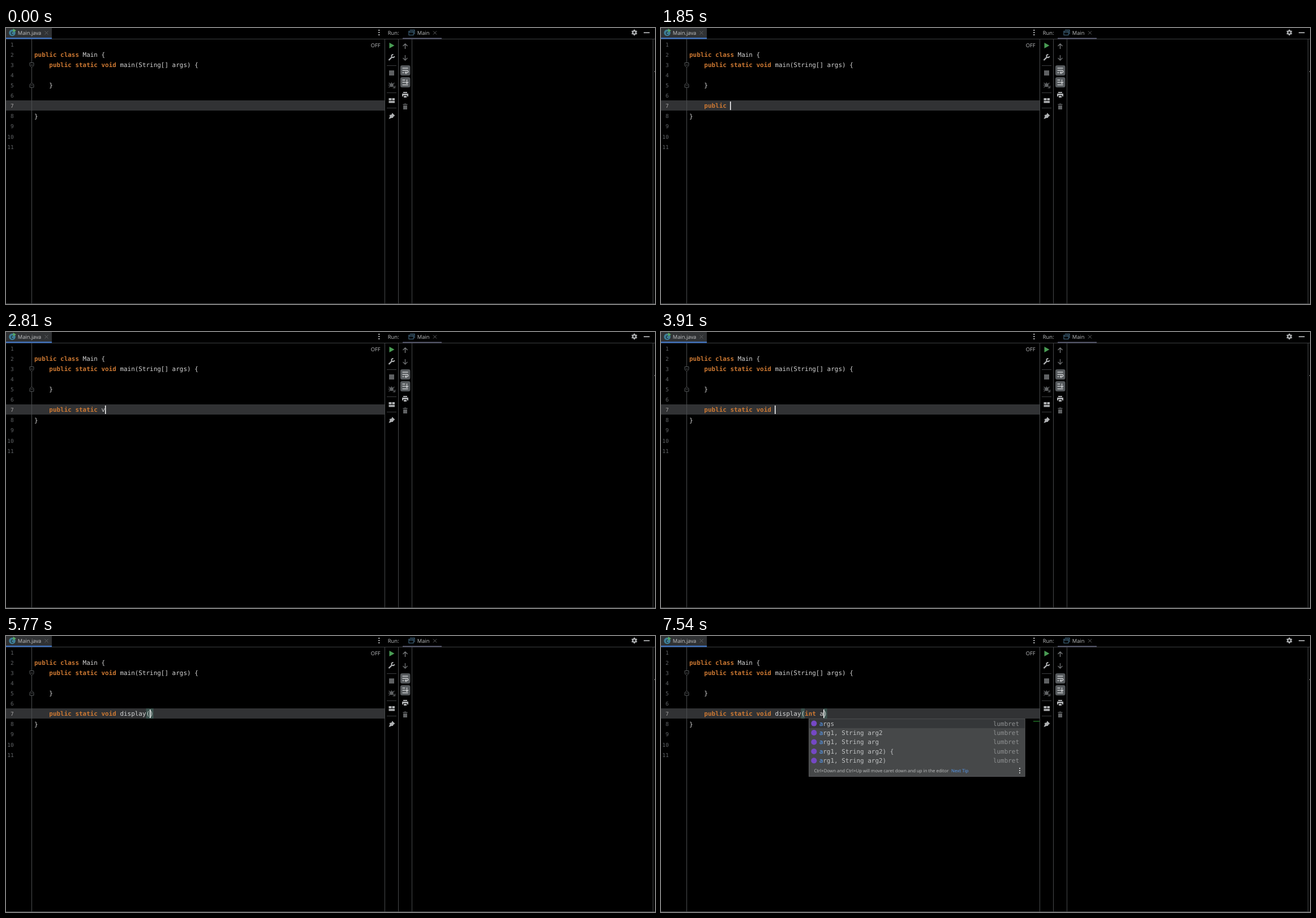
These frames come from a looping animation (1147 by 488 pixels, 8000 ms). An HTML page with a canvas:

```html
<!DOCTYPE html>
<html lang="en">
<head>
<meta charset="utf-8">
<title>Code completion</title>
<style>
  html, body { margin: 0; width: 100%; height: 100%; overflow: hidden; background: #000; }
  canvas { display: block; }
</style>
</head>
<body>
<canvas width="1147" height="488"></canvas>
<script>
const ctx = document.querySelector('canvas').getContext('2d');
const LOOP = 8000;
const CHAR = 6.586, INDENT = 76.3, ROW = 16.44;
const MONO = '10.94px "DejaVu Sans Mono", monospace';
const UI = '9.3px "Open Sans", sans-serif';
const SMALL = '7.85px "Open Sans", sans-serif';
const KEYWORD = '#cc7832', CODE = '#d4d4d4', ICON = '#afb1b3', DIM = '#5f6163', LINE = '#3c3e40';

const TYPED = 'public static void display(int a';

const HINT_CARET = 'Ctrl+Down and Ctrl+Up will move caret down and up in the editor';
const HINT_DOT = 'Press Ctrl+. to choose the selected (or first) suggestion and insert a dot afterwards';
const HINT_KEYS = 'Dot, space and some other keys will also close this lookup and be inserted into editor';

// Suggestion rows: [icon, text, grey text, right-hand tag]
const keyword = text => ['', text, '', ''];
const ai = text => ['ai', text, '', 'lumbret'];
const method = (text, rest) => ['method', text, rest + ' {...}', 'Object'];
const template = (text, note, tag = '') => ['template', text, note, tag];

const intRows = [
  keyword('int'), ai('int x, int y, int width, int height'), ai('int x, int y'),
  ai('int arg1, String arg2'), ai('int arg1, String arg'),
  ai('int x, int y, int width, int height) {')
];
const display = endings => endings.map(end => ai('display(String' + end));

// start: column of the word being completed
const menus = {
  public: { start: 0, x: 53, hint: HINT_CARET, rows: [
    keyword('public'), ai('public static void main(String[] args'),
    ai('public static void main(String[]'), ai('public static void main(String'),
    keyword('private'), keyword('protected'),
    method('public boolean equals', '(Object obj)'),
    ai('public static void main(String[] args)'), ai('public static void main(String[] args) {'),
    method('public int hashCode', '()'), method('public String toString', '()'),
    method('protected Object clone', '()')
  ] },
  static: { start: 7, x: 99, wide: 413, hint: HINT_DOT, rows: [
    keyword('static'), ai('static void main(String[] args'), keyword('strictfp'),
    ai('static void main(String[]'), template('starter', '   Creates a static start(...) helper method …'),
    ai('static void main(String'), ai('static void main(String[] args) {'),
    ai('static void main(String[] args)'), keyword('synchronized'),
    method('public String toString', '()'), template('stopship', '', 'adds // STOPSHIP'),
    method('public int hashCode', '()')
  ] },
  void: { start: 14, x: 149, hint: HINT_CARET, rows: [
    keyword('void'), ai('void main(String[] args) {'), ai('void main(String[] args)'),
    ai('void main(String[] args'), ai('void main(String'), ai('void main(String[]'), keyword('volatile')
  ] },
  displa: { start: 19, x: 182, hint: HINT_CARET, rows: display(['[] args) {', '[] args', '[] args)', '[]', '']) },
  display: { start: 19, x: 182, hint: HINT_CARET, rows: display(['[] args) {', '[] args)', '[] args', '', '[]']) },
  in: { start: 27, x: 234, hint: HINT_KEYS, rows: intRows },
  int: { start: 27, x: 234, hint: HINT_DOT, rows: intRows },
  args: { start: 31, x: 261, hint: HINT_CARET, rows: [
    ai('args'), ai('arg1, String arg2'), ai('arg1, String arg'), ai('arg1, String arg2) {'), ai('arg1, String arg2)')
  ] }
};

// [time, typed characters, open menu, caret hidden]
const steps = [
  [0, 0, '', true], [100, 0], [640, 0, '', true],
  [1050, 1], [1100, 1, 'public'], [1200, 2, 'public'], [1330, 3, 'public'], [1430, 4, 'public'],
  [1530, 5, 'public'], [1640, 6, 'public'], [1850, 7],
  [1950, 8], [2000, 8, 'static'], [2090, 9, 'static'], [2190, 10, 'static'], [2280, 11, 'static'],
  [2370, 12, 'static'], [2460, 13, 'static'], [2640, 14],
  [2810, 15], [2860, 15, 'void'], [2920, 16, 'void'], [3010, 17, 'void'], [3110, 18, 'void'], [3910, 19],
  [4080, 20], [4130, 20, 'displa'], [4220, 21, 'displa'], [4330, 22, 'displa'], [4430, 23, 'displa'],
  [4540, 24, 'displa'], [4650, 25, 'displa'], [4790, 26, 'display'], [5570, 26, 'display', true],
  [5770, 27], [6540, 28], [6580, 28, 'in'], [6820, 29, 'in'], [6920, 30, 'in'], [6960, 30, 'int'],
  [7300, 31], [7470, 32], [7540, 32, 'args']
];

function rect(x, y, w, h, color) {
  ctx.fillStyle = color;
  ctx.fillRect(x, y, w, h);
}

function text(value, x, y, color, font = MONO, align = 'left') {
  ctx.font = font;
  ctx.textAlign = align;
  ctx.fillStyle = color;
  ctx.fillText(value, x, y);
}

function dot(x, y, r, color) {
  ctx.fillStyle = color;
  ctx.beginPath();
  ctx.arc(x, y, r, 0, 7);
  ctx.fill();
}

// SVG path centred on (x, y); a line width of 0 fills it
function shape(x, y, d, color, width = 0) {
  ctx.save();
  ctx.translate(x, y);
  ctx.fillStyle = ctx.strokeStyle = color;
  ctx.lineWidth = width;
  width ? ctx.stroke(new Path2D(d)) : ctx.fill(new Path2D(d));
  ctx.restore();
}

function box(x, y, w, h, r, color) {
  ctx.fillStyle = color;
  ctx.beginPath();
  ctx.roundRect(x, y, w, h, r);
  ctx.fill();
}

function kebab(x, y) {
  for (const dy of [-4, 0, 4]) rect(x - 1, y + dy - 1, 2, 2, '#c4c6c8');
}

const cross = (x, y) => shape(x, y, 'M-3-3L3 3M3-3L-3 3', DIM, 1);
const lineY = n => 29 + 18.1 * (n - 1) + 3.8;

function code(value, x, n) {
  let column = 0;
  for (const part of value.split(/\b(public|static|void|class|int)\b/)) {
    const isKeyword = /^(public|static|void|class|int)$/.test(part);
    text(part, x + column * CHAR, lineY(n), isKeyword ? KEYWORD : CODE, (isKeyword ? 'bold ' : '') + MONO);
    column += part.length;
  }
}

function drawToolbar() {
  const x = 681.5, x2 = 705.5;
  shape(x, 31, 'M-4-5L5 0L-4 5Z', '#499c54');
  shape(x, 53, 'M-5 4L1-2', ICON, 2.4);
  shape(x + 2, 50, 'M1-3A2.6 2.6 0 1 0 3 0', ICON, 2);
  for (const y of [66, 114, 141]) rect(673, y, 17, 1, LINE);
  rect(677, 75, 9, 9, DIM);
  dot(x, 101, 3.2, DIM);
  shape(x, 101, 'M-5-4L5 4M-5 4L5-4M-6 0H3M0-5V3M2 5H6V1', DIM, 1.1);
  rect(676.5, 124, 5, 4, ICON);
  rect(682.5, 124, 4.5, 4, ICON);
  rect(676.5, 129, 10.5, 3.5, ICON);
  shape(x, 155, 'M1-5L6 0L4 1L2 4L0 4L-5 6L-3 1L-4-1L0-2Z', ICON);

  shape(x2, 32, 'M0 5V-4M-4 0L0-4L4 0', '#77797b', 1.4);
  shape(x2, 53, 'M0-5V4M-4 0L0 4L4 0', '#6a6c6e', 1.4);
  box(697, 66, 17.5, 18, 3, '#55595c');
  box(697, 87, 17.5, 18, 3, '#55595c');
  shape(x2, 75, 'M-5-4H5M-5 0H3C6 0 6 4 3 4H0M2 2L0 4L2 6M-5 4H-2', '#c8cacc', 1.3);
  shape(x2, 96, 'M-5-4H0M-5 0H0M-5 4.5H5M3-5V2M0.5-0.5L3 2L5.5-0.5', '#c8cacc', 1.3);
  rect(702, 113, 7, 2, ICON);
  rect(700, 116, 11, 5, ICON);
  rect(702, 119, 7, 4.5, '#000');
  rect(703, 120, 5, 3, ICON);
  rect(701.5, 134.5, 8, 1.5, DIM);
  rect(704, 133.5, 3, 1, DIM);
  rect(702, 137, 7, 7, DIM);
}

function drawWindow() {
  rect(0, 0, 1147, 488, '#000');
  rect(0, 0, 81, 19, '#303234');
  rect(0, 19, 1147, 1, LINE);
  rect(0, 17, 81, 2.5, '#3f6fb8');
  dot(11, 8.5, 5.8, '#3f7f98');
  text('C', 10.7, 11.6, '#1c2b31', 'bold 8px "Open Sans", sans-serif', 'center');
  shape(14, 4.5, 'M-1.5-3.5L4 0L-1.5 3Z', '#55a85f');
  text('Main.java', 20.8, 12, '#c6c8ca', UI);
  cross(71.5, 8.5);
  kebab(659.3, 8);

  text('Run:', 674.8, 12, '#c0c2c4', UI);
  shape(717, 8, 'M-3-4.5H5V3M-5-2.5H3V4.5H-5ZM-5-0.5H3', '#41667f', 1.2);
  text('Main', 726.8, 12, '#c0c2c4', UI);
  cross(758, 8.5);
  rect(701, 17.5, 69, 2, '#595b70');
  dot(1110.5, 8, 4, ICON);
  shape(1110.5, 8, 'M0-5.3V5.3M-4.6-2.6L4.6 2.6M-4.6 2.6L4.6-2.6', ICON, 2.2);
  dot(1110.5, 8, 1.8, '#000');
  rect(1127, 7.5, 10.5, 1.6, '#c4c6c8');

  rect(0, 128, 669, 18, '#313234');
  rect(45, 20, 1, 467, '#4b4d4f');
  for (const x of [669, 693, 717]) rect(x, 20, 1, 467, '#46484a');
  rect(1143, 20, 1, 467, '#46484a');
  rect(0, 487, 1147, 1, '#46484a');
  rect(1146, 76, 1, 2, '#888');
  text('OFF', 644.8, 34, '#c0c2c4', UI);

  for (let n = 1; n <= 11; n++) {
    text(n, 13.6, lineY(n) - .2, n === 7 ? '#a4a3a3' : '#606366', '9.5px "DejaVu Sans Mono", monospace', 'right');
  }
  for (const [y, d] of [[65.5, 'M-3.5-4H3.5V1L0 4L-3.5 1Z'], [101, 'M-3.5 4H3.5V-1L0-4L-3.5-1Z']]) {
    shape(45.5, y, d, '#000');
    shape(45.5, y, d + 'M-2 0H2', '#55585a', 1);
  }
  code('public class Main {', 50, 2);
  code('public static void main(String[] args) {', INDENT, 3);
  code('}', INDENT, 5);
  code('}', 50, 8);
  drawToolbar();
}

function drawIcon(kind, x, y) {
  if (kind === 'ai') dot(x, y, 5, '#7548c4');
  if (kind === 'method') {
    dot(x, y, 5.6, '#b0606e');
    text('m', x, y + 2.6, '#33292b', '8px "Open Sans", sans-serif', 'center');
  }
  if (kind === 'template') shape(x, y, 'M-2-5H2V-3L1-2V1H5V3H-5V1H-1V-2L-2-3ZM-5 4H5V5H-5Z', ICON);
}

function drawMenu(menu, length) {
  const prefix = TYPED.slice(menu.start, length);
  const rows = menu.rows.filter(row => row[1].toLowerCase().includes(prefix));
  const width = prefix.length === 1 && menu.wide || 382;
  const listHeight = Math.min(rows.length, 11.5) * ROW;
  const height = listHeight + 20.6;
  const { x } = menu, top = 146, right = x + width;
  const textX = INDENT + menu.start * CHAR - .8;
  const iconX = x + (textX - x) / 2;

  rect(x, top, width + .6, height, '#5b5d5f');
  rect(x + 1, top + 1, width - 1.4, height - 2, '#464849');
  rect(x + 1, top + .6, width - 1.4, ROW - .2, '#353739');

  ctx.save();
  ctx.beginPath();
  ctx.rect(x, top, width, listHeight);
  ctx.clip();
  rows.forEach(([icon, label, rest, tag], i) => {
    const y = top + ROW * i + 8.6;
    const font = (icon ? '' : 'bold ') + MONO;
    const matched = label.toLowerCase().indexOf(prefix) + prefix.length;
    drawIcon(icon, iconX, y);
    text(label.slice(0, matched), textX, y + 4, '#589df6', font);
    text(label.slice(matched), textX + matched * CHAR, y + 4, '#c0c2c3', font);
    text(rest, textX + label.length * CHAR, y + 4, '#8b8d8e');
    text(tag, right - 10, y + 4, '#8f9192', MONO, 'right');
  });
  ctx.restore();

  const hintY = top + height - 8;
  text(menu.hint, x + 9.4, hintY, '#c0c2c3', SMALL);
  const hintWidth = ctx.measureText(menu.hint).width;
  text('Next Tip', x + 14 + hintWidth, hintY, '#589df6', SMALL);
  kebab(right - 9, hintY - 2.8);
}

function draw(time) {
  const [, length, menuName, caretHidden] = steps.findLast(step => step[0] <= time);
  const typed = TYPED.slice(0, length);
  const open = typed.indexOf('(');
  const caretX = INDENT + length * CHAR;
  drawWindow();
  if (open >= 0) {
    for (const column of [open, length]) rect(INDENT + column * CHAR, 128, CHAR, 18, '#3b514d');
  }
  code(open >= 0 ? typed + ')' : typed, INDENT, 7);
  if (!caretHidden) rect(Math.floor(caretX), 130, 1.5, 15, '#fff');
  if (menuName) drawMenu(menus[menuName], length);
  if (menuName === 'args') rect(658, 150, 11, 1.5, '#1f6d24');
}

ctx.textRendering = 'geometricPrecision';
const started = performance.now();
function frame() {
  draw((performance.now() - started) % LOOP);
  requestAnimationFrame(frame);
}
frame();
</script>
</body>
</html>
```
